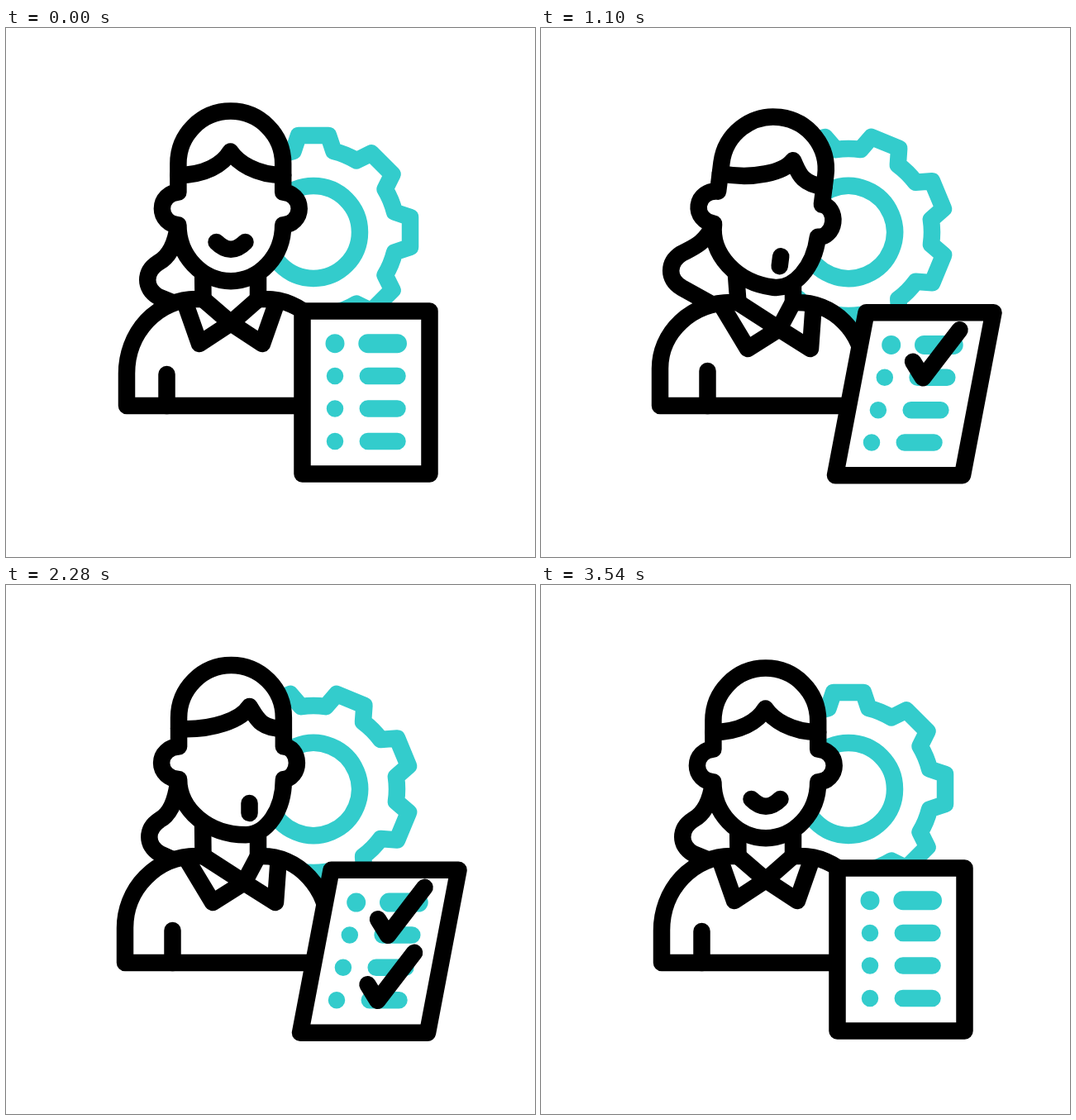
Write an HTML page with a canvas that moves like this. It is 640x640 px and loops after 3600 ms.

```html
<!DOCTYPE html>
<html>
<head>
<meta charset="utf-8">
<style>
  html, body { margin: 0; width: 100%; height: 100%; overflow: hidden; background: #fff; }
  canvas { display: block; }
</style>
</head>
<body>
<canvas id="stage" width="640" height="640"></canvas>
<script>
const ctx = document.getElementById('stage').getContext('2d');
const LOOP = 3600, TEAL = '#33cccc', LINE = 20.5, { PI } = Math;

const mix = (a, b, f) => a + (b - a) * f;
const radians = degrees => degrees * PI / 180;

// Smooth 0..1 ramp between two times
const ramp = (t, from, to) => {
  const u = Math.min(1, Math.max(0, (t - from) / (to - from)));
  return u * u * (3 - 2 * u);
};

function pen(color, width = LINE) {
  ctx.strokeStyle = color;
  ctx.lineWidth = width;
}

function shape(build, filled) {
  ctx.beginPath();
  build();
  if (filled) ctx.fill();
  ctx.stroke();
}

function line(x1, y1, x2, y2) {
  ctx.moveTo(x1, y1);
  ctx.lineTo(x2, y2);
}

function drawGear(degrees) {
  const polar = (r, a) => [r * Math.cos(a), r * Math.sin(a)];
  ctx.save();
  ctx.translate(372, 247);
  ctx.rotate(radians(degrees));
  pen(TEAL);
  shape(() => ctx.arc(0, 0, 56, 0, 2 * PI));
  shape(() => {
    for (let a = 0; a < 2 * PI - 0.1; a += PI / 4) {
      ctx.lineTo(...polar(118.4, a - 0.153));
      ctx.lineTo(...polar(118.4, a + 0.153));
      ctx.arc(0, 0, 101, a + 0.244, a + PI / 4 - 0.244);
    }
    ctx.closePath();
  });
  ctx.restore();
}

function drawPonytail(turn, sway) {
  const x = 184 + 2 * turn - 16 * sway, y = 284 - 11 * sway;
  shape(() => {
    ctx.moveTo(208, 240);
    ctx.bezierCurveTo(205 - 7 * sway, 261, x + 13, y - 7, x, y);
    ctx.bezierCurveTo(x - 17, y + 11, x - 17, y + 31, x, y + 41);
    ctx.lineTo(206, 334);
  }, true);
}

function drawBody(turn, sway) {
  const at = (front, turned) => mix(front, turned, turn);
  const drop = 4 * sway;
  const neck = 328 + drop, armpit = at(418, 415) - 3 * sway, rise = armpit - neck;

  shape(() => {
    ctx.moveTo(at(146, 144), 457);
    ctx.ellipse(230, armpit, at(84, 86), rise, 0, PI, 1.5 * PI);
    ctx.lineTo(238.5, neck);
    ctx.lineTo(238 - 3 * sway, 285);
    ctx.lineTo(305, 285);
    ctx.lineTo(305, neck);
    ctx.ellipse(at(314, 310), armpit, at(84, 80), rise, 0, 1.5 * PI, 2 * PI);
    ctx.lineTo(390, 457);
    ctx.closePath();
  }, true);

  const throatX = at(272, 288), throatY = at(357, 360) + drop;
  for (const side of [-1, 1]) {
    shape(() => {
      ctx.moveTo(271.7 + 33.3 * side, neck);
      ctx.lineTo(throatX, throatY);
      ctx.lineTo(throatX + 38 * side, at(382, 384) + drop);
      ctx.lineTo(at(272, 275) + 54.5 * side, 335 + drop);
    });
  }
  const armX = at(194.5, 201.5);
  shape(() => line(armX, armpit + at(1, 3), armX, 457));
}

function drawHead(turn, sway) {
  const at = (front, turned) => mix(front, turned, turn);
  const radius = 63.4, middle = at(271.8, 272.5), left = middle - radius, right = middle + radius;
  const earY = at(218.5, 215.3), earHeight = 19.7, jawY = earY + earHeight;
  const chinX = at(272, 290), chinHeight = at(68, 67.3);

  ctx.save();
  ctx.translate(195, 236);
  ctx.rotate(radians(7.2 * sway));
  ctx.translate(-195, -236);

  shape(() => {
    ctx.arc(middle, at(164, 160.5), radius, PI, 2 * PI);
    ctx.ellipse(right, earY, at(19.5, 16), earHeight, 0, -PI / 2, PI / 2);
    ctx.ellipse(chinX, jawY, right - chinX, chinHeight, 0, 0, PI / 2);
    ctx.ellipse(chinX, jawY, chinX - left, chinHeight, 0, PI / 2, PI);
    ctx.ellipse(left, earY, at(19.5, 21), earHeight, 0, PI / 2, 1.5 * PI);
    ctx.closePath();
  }, true);

  const partX = at(271.5, 294.5), partY = at(149.5, 147), hairY = at(178, 174);
  shape(() => {
    ctx.moveTo(left, hairY);
    ctx.bezierCurveTo(left + at(32, 41), hairY + 2 * turn, partX - 9.5, partY + 16, partX, partY);
    ctx.bezierCurveTo(partX + 8.5, partY + 13, partX + at(31, 12.5), hairY, right, hairY);
  });

  const mouthX = at(272, 294.5), mouthY = at(259, 270), smile = 17.5 * (1 - turn), gape = 6 * turn;
  shape(() => {
    ctx.moveTo(mouthX - smile, mouthY - gape);
    ctx.quadraticCurveTo(mouthX, mouthY + smile, mouthX + smile, mouthY + gape);
  });
  ctx.restore();
}

function drawPerson(t) {
  const turn = ramp(t, 0, 400) - ramp(t, 3200, 3540);
  const phase = (t + 400) % 800;
  const low = t < 400 ? 1 : Math.abs(ramp(phase, 0, 400) - 1 + ramp(phase, 400, 800) * (phase > 400 ? 1 : 0) + (phase > 400 ? 0 : 0));
  const sway = turn * (low - 0.216) / 0.628;
  pen('#000');
  drawPonytail(turn, sway);
  drawBody(turn, sway);
  drawHead(turn, sway);
}

function drawCheck(x, y, start, end) {
  if (end <= start) return;
  const length = 96;
  ctx.setLineDash([(end - start) * length, 200]);
  ctx.lineDashOffset = -start * length;
  shape(() => {
    line(x, y, x + 12, y + 19.5);
    ctx.lineTo(x + 56.5, y - 38.5);
  });
  ctx.setLineDash([]);
}

function drawBoard(t) {
  const skew = ramp(t, 0, 400) - ramp(t, 3000, 3400);
  const sink = ramp(t, 400, 800) - ramp(t, 800, 1200) + ramp(t, 1600, 2000) - ramp(t, 2000, 2400);
  const top = 35 * skew, bottom = -2.5 * skew;
  ctx.save();
  ctx.translate(0, 11 * sink);

  pen('#000');
  shape(() => {
    line(358.5 + top, 342.5, 512.5 + top, 342.5);
    ctx.lineTo(512.5 + bottom, 539.5);
    ctx.lineTo(358.5 + bottom, 539.5);
    ctx.closePath();
  }, true);

  for (let row = 0; row < 4; row++) {
    const x = 398 + skew * (25.7 - 7.9 * row), y = 381.7 + 39.4 * row;
    pen(TEAL, row ? LINE : 23);
    shape(() => {
      line(x, y, x, y);
      line(x + 39.8, y, x + 75.5, y);
    });
  }

  const erased = ramp(t, 2600, 3000);
  pen('#000');
  drawCheck(450, 402, erased, ramp(t, 400, 800));
  drawCheck(437.5, 481, erased, ramp(t, 1600, 2000));
  ctx.restore();
}

function frame(now) {
  const t = now % LOOP;
  ctx.lineCap = ctx.lineJoin = 'round';
  ctx.fillStyle = '#fff';
  ctx.fillRect(0, 0, 640, 640);
  drawGear(151.5 * (ramp(t, 0, 1650) - ramp(t, 1660, 3530)));
  drawPerson(t);
  drawBoard(t);
}

const startTime = performance.now();
function tick() {
  frame(performance.now() - startTime);
  requestAnimationFrame(tick);
}
tick();
</script>
</body>
</html>
```
